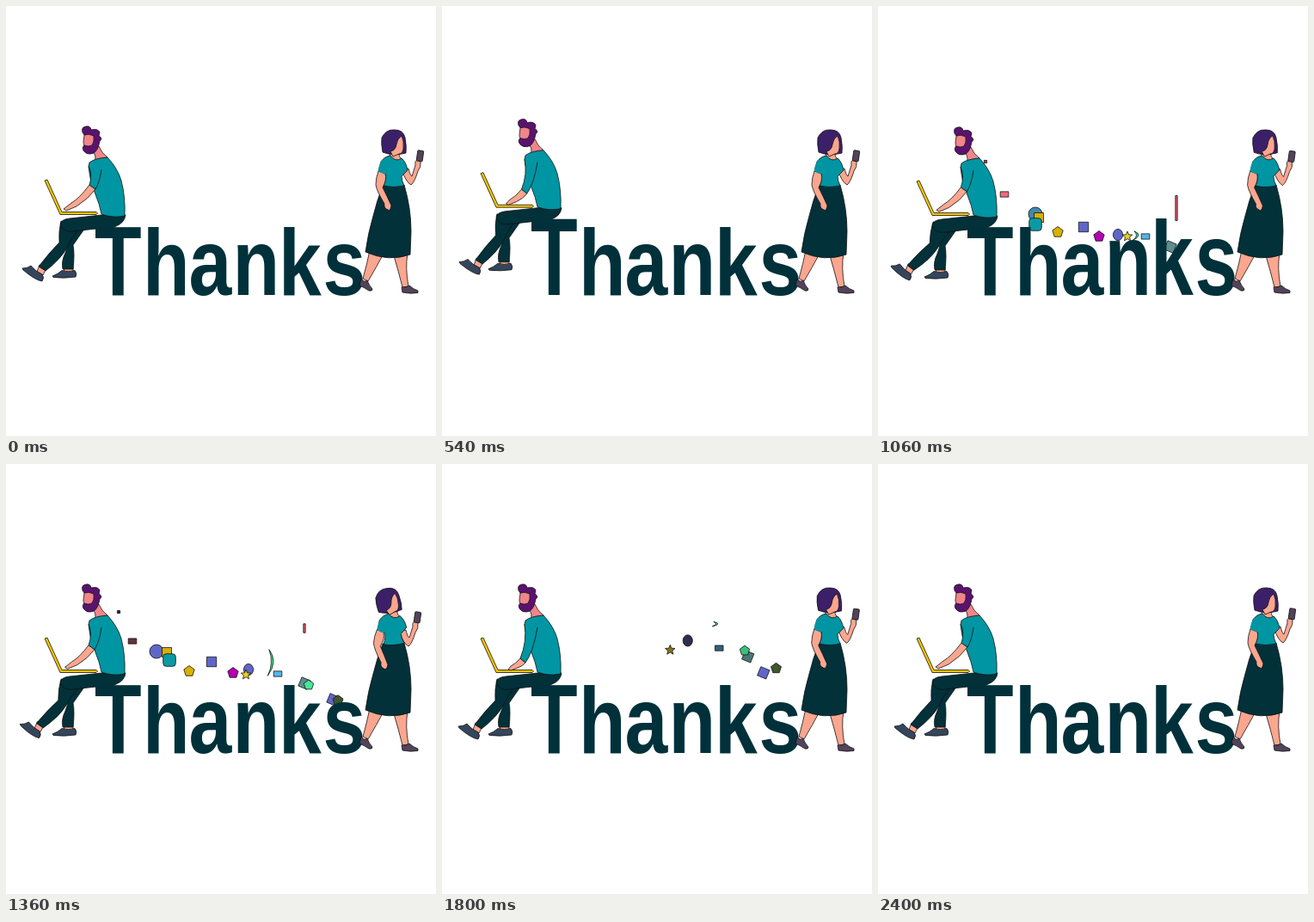
Animation, 500 px wide and 500 px high, one loop 2460 ms. Source, as an HTML page:

```html
<!DOCTYPE html>
<html lang="en">
<head>
<meta charset="utf-8">
<title>Thanks</title>
<style>
  html, body { margin: 0; width: 100%; height: 100%; overflow: hidden; background: #fff; }
  svg { display: block; width: 100vw; height: 100vh; }
  text { font: bold 110px "Liberation Sans", Arial, sans-serif; fill: #00313a; }
  .ink { stroke: #121212; stroke-width: .8; stroke-linejoin: round; }
  .dark { fill: #02313a; }
  .teal { fill: #0095a2; }
  .skin { fill: #fba68f; }
  .rosy { fill: #f0858a; }
  .plum { fill: #5a126e; }
  .violet { fill: #3b2069; }
  .gold { fill: #f7c600; }
  .slate { fill: #34465c; }
  .mauve { fill: #52435a; }
</style>
</head>
<body>
<svg viewBox="0 0 500 500">
  <g id="confetti" class="ink"></g>

  <g id="man" class="ink">
    <g>
      <path class="skin" d="M68 303 L67 310 L78 310 L78 303Z"/>
      <path class="slate" d="M54 314 Q60 312 65 307.500 Q72 310 80 307.500 Q83 311 81 315 Q68 317 55 315.500Z"/>
      <path class="dark" d="M72 258 Q74 275 69 287 Q64 297 66 306 L78 306 Q80 288 78 278 L92 258Z"/>
    </g>
    <g id="shin">
      <path class="skin" d="M39 301 L36 309 L43 313 L47 305Z"/>
      <path class="slate" d="M19 305 Q25 305 29 302 Q35 309 42 312 Q45 316 42 320 Q34 319 20 307Z"/>
      <path class="dark" d="M64 250 Q61 262 62 275 Q50 287 38 303 L46 308 Q64 294 71 281 Q77 268 84 260Z"/>
    </g>
    <path class="dark" d="M63 254 Q64 248 74 247 L111 243 L139 243 Q138 252 128 256 Q118 262 105 259 L78 262 Q67 264 63 254Z"/>
    <path class="gold" d="M45 203 L48 202 L65 239.500 L105 239.500 Q108 241 105 242.500 L63 242.500Z"/>
    <path class="rosy" d="M102 162 L108 163 Q111 171 118 176 L104 180 Q105 174 101 168Z"/>
    <path class="teal" d="M97 182 Q103 177 118 176 Q130 189 134 203 Q139 222 138 244 Q124 247 111 242 Q109 231 104 219 Q97 202 96 187Z"/>
    <path id="hand" class="skin"/>
    <path id="sleeve" class="teal"/>
    <g id="head">
      <path class="rosy" d="M91 150 Q95 146 103 150 L105 160 L95 167 Q90 164 90 158Z"/>
      <path class="plum" d="M89 147 Q87 141 93 140 Q98 139 99 144 Q107 142 109 147 L108 151 Q113 154 109 157 Q107 168 102 171 Q94 174 90 168 Q88 164 91 162 Q96 164 100 162 Q103 158 102 151 Q96 148 91 150Z"/>
    </g>
  </g>

  <g id="letters"></g>

  <g id="woman" class="ink">
    <path class="skin" d="M423 284 Q420 299 415 317 L421 320 Q431 303 439 288Z"/>
    <path class="skin" d="M450 287 Q456 307 461 327 L468 326 Q464 305 467 287Z"/>
    <path class="mauve" d="M413 317 Q416 322 420 319 Q422 325 426 329 Q426 332 422 331 Q416 327 411 325Z"/>
    <path class="mauve" d="M460 327 Q465 328 469 325 Q473 329 479 331 L479 333.500 Q470 335 461 333Z"/>
    <g id="phoneArm">
      <path class="skin" d="M460 190 L468 189 Q470 197 472 198 L476 185 Q475 179 479 179 L482 181 Q483 187 479 192 Q475 205 471 208 Q465 205 460 190Z"/>
      <rect class="mauve" x="478" y="168" width="7" height="12.500" rx="1" transform="rotate(8 481 174)"/>
    </g>
    <path class="dark" d="M438 209 L463 208 Q471 235 471 262 L470 289 Q445 298 418 286 Q421 264 427 244 Q431 227 438 209Z"/>
    <g id="torso">
      <path class="skin" d="M447 165 L459 168 Q455 174 460 178 Q454 184 446 177Z"/>
      <path class="teal" d="M436 181 Q440 175 447 174 Q453 182 460 177 Q465 181 467 191 L460 198 Q460 203 463 209 Q450 212 439 209 Q443 200 441 194 L433 192Z"/>
      <g id="looseArm">
        <path class="skin" d="M433 192 L441 195 Q443 202 438 211 Q443 221 448 232 Q447 239 444 237 Q439 235 440 230 Q431 215 430 208 Q430 200 433 192Z"/>
        <path class="teal" d="M437 179 Q433 186 433 192 Q438 196 443 195 L445 181Z" stroke="none"/>
      </g>
      <g id="bob">
        <path class="violet" d="M438 170 Q436 160 437 153 Q442 143 452 144 Q462 144 464 153 Q466 163 465 171 Q450 175 438 170Z"/>
        <path class="skin" d="M460 151 Q463 157 462 166 Q461 172 457 172 L450 175 L447 169 Q453 168 454 161 Q455 154 460 151Z"/>
      </g>
    </g>
  </g>
</svg>
<script>
const LOOP = 2460, STEP = 20, LAST = 2400;
const NS = 'http://www.w3.org/2000/svg';
const $ = id => document.getElementById(id);
const lerp = (a, b, k) => a + (b - a) * k;
const clamp = v => Math.max(0, Math.min(1, v));
const add = (parent, tag, attrs) => {
  const el = parent.appendChild(document.createElementNS(NS, tag));
  for (const k in attrs) el.setAttribute(k, attrs[k]);
  return el;
};

// Eased value from [time, value] pairs
const track = (...keys) => t => {
  let i = 1;
  while (i < keys.length - 1 && t > keys[i][0]) i++;
  const [t0, a] = keys[i - 1], [t1, b] = keys[i];
  const k = clamp((t - t0) / (t1 - t0));
  return lerp(a, b, (1 - Math.cos(Math.PI * k)) / 2);
};
const bump = (t, mid, half) =>
  Math.abs(t - mid) < half ? Math.cos((t - mid) / half * Math.PI / 2) ** 2 : 0;

// Letter, x, time of its hop, width and height factors
const letters = [
  ['T', 103.1, 550, .813, 1.043], ['h', 159, 710, .813, .99],
  ['a', 212.5, 800, .813, 1], ['n', 263.5, 970, .813, 1],
  ['k', 317, 1050, .813, .99], ['s', 368.5, 1120, .813, 1]
].map(([ch, x, mid, sx, sy]) => {
  const el = add($('letters'), 'text', {});
  el.textContent = ch;
  return { el, x, mid, sx, sy };
});

const poly = (n, inner) => {
  const count = inner ? n * 2 : n;
  return 'M' + Array.from({ length: count }, (_, i) => {
    const a = i / count * 2 * Math.PI - Math.PI / 2;
    const r = inner && i % 2 ? inner : 1;
    return `${(r * Math.cos(a)).toFixed(3)} ${(r * Math.sin(a)).toFixed(3)}`;
  }).join('L') + 'Z';
};
const shapes = {
  disc: 'M-1 0A1 1 0 1 1 1 0A1 1 0 1 1 -1 0Z',
  oval: 'M-.85 0A.85 1 0 1 1 .85 0A.85 1 0 1 1 -.85 0Z',
  box: 'M-1 -1H1V1H-1Z',
  soft: 'M-.5 -1H.5Q1 -1 1 -.5V.5Q1 1 .5 1H-.5Q-1 1 -1 .5V-.5Q-1 -1 -.5 -1Z',
  tilt: 'M-.5 -1.2L1.2 -.5L.5 1.2L-1.2 .5Z',
  slab: 'M-1 -.65H1V.65H-1Z',
  bar: 'M-.08 -1H.08V1H-.08Z',
  arc: 'M-.2 -1Q.5 -.1 -.3 1Q.18 0 -.2 -1Z',
  pent: poly(5),
  star: poly(5, .45)
};

const indigo = '#6066c8', amber = '#d9b000', sky = '#55b5ea', mint = '#45e896';
// Shape, colour, size, x and y at 1060 ms, x and y at 1360 ms, birth, death
const bits = [
  ['slab', '#f2697c', 4.8, 147, 219, 147, 206, 650, 1450],
  ['box', '#b03a55', 1.6, 125, 181, 131, 172, 900, 1430],
  ['disc', indigo, 8, 183, 242, 175, 218, 1160, 1700],
  ['disc', sky, 8, 183, 242, 175, 218, 640, 1240],
  ['box', amber, 5.5, 187, 246, 187, 219, 660, 1680],
  ['soft', '#0b9aa5', 7.3, 183, 254, 190, 228, 800, 1700],
  ['pent', amber, 6.5, 209, 263, 213, 241, 820, 1740],
  ['box', indigo, 5.7, 239, 257, 239, 230, 860, 1700],
  ['pent', '#b400b0', 6.5, 257, 268, 264, 243, 880, 1740],
  ['oval', indigo, 6.6, 279, 266, 282, 239, 920, 1880],
  ['star', '#e6cf22', 6, 290, 268, 279, 245, 940, 1930],
  ['arc', mint, 15.5, 301, 267, 309, 231, 960, 1850],
  ['slab', sky, 4.8, 311, 268, 316, 244, 950, 1920],
  ['bar', '#f0566b', 14.5, 347, 235, 347, 191, 680, 1450],
  ['tilt', '#5d8f90', 6, 340, 280, 347, 255, 960, 2000],
  ['pent', mint, 6, 352, 289, 352, 257, 1060, 2000],
  ['tilt', indigo, 6, 385, 299, 380, 274, 1080, 2120],
  ['pent', '#3f562f', 6.3, 384, 305, 386, 275, 1020, 2120]
].map(([shape, color, size, x0, y0, x1, y1, birth, death]) => ({
  el: add($('confetti'), 'path', { d: shapes[shape], 'vector-effect': 'non-scaling-stroke' }),
  swells: shape === 'bar' || shape === 'arc',
  color, size, x0, y0, x1, y1, birth, death
}));

const sag = track([0, 0], [300, 0], [740, 2], [1060, 1], [1360, 0], [LAST, 0]);
const kick = track([0, 0], [300, 0], [740, -2], [1060, 4.5], [1180, 7], [1360, 3], [1800, 0], [LAST, 0]);
const reach = track([0, 0], [300, .4], [740, 1], [1060, .1], [1360, .15], [1800, 1], [LAST, 0]);
const lean = track([0, 0], [740, 0], [1060, .15], [1360, 1], [1800, .1], [LAST, 0]);

const place = (id, value) => $(id).setAttribute('transform', value);

function drawMan(t) {
  place('man', `translate(0 ${sag(t) - 9.5 * bump(t, 550, 210)})`);
  place('shin', `rotate(${kick(t)} 66 253)`);
  const k = reach(t);
  const at = (x0, y0, x1, y1) => `${lerp(x0, x1, k)} ${lerp(y0, y1, k)} `;
  const cuffA = at(97, 208, 91, 226), cuffB = at(104, 213, 97, 231);
  $('hand').setAttribute('d', 'M' + cuffA + 'Q' + at(85, 224, 86, 232) + at(76, 229, 80, 235)
    + 'L' + at(67, 236, 77, 239) + 'L' + at(70, 238, 80, 240) + 'L' + at(82, 233, 88, 237)
    + 'Q' + at(96, 224, 94, 235) + cuffB + 'Z');
  $('sleeve').setAttribute('d', 'M96 186Q' + at(101, 196, 99, 207) + cuffA + 'L' + cuffB
    + 'Q' + at(109, 205, 106, 219) + '111 190');
}

function drawWoman(t) {
  const k = lean(t);
  place('torso', `rotate(${-3.5 * k} 451 210)`);
  place('bob', `translate(${-2 * k} 0) rotate(${-5 * k} 453 174)`);
  place('looseArm', `rotate(${7 * k} 438 188)`);
  place('phoneArm', `translate(${-3 * k} ${4 * k})`);
}

function drawLetters(t) {
  for (const { el, x, mid, sx, sy } of letters) {
    const hop = 1 + .12 * bump(t, mid, 210);
    el.setAttribute('transform', `translate(${x} 336) scale(${sx} ${sy * hop})`);
  }
}

function drawConfetti(t) {
  for (const b of bits) {
    const alive = t > b.birth && t < b.death;
    b.el.style.display = alive ? '' : 'none';
    if (!alive) continue;
    let s = (t - 1060) / 300;
    if (s > 1) s = 1 + (s - 1) * .85;
    const life = (t - b.birth) / (b.death - b.birth);
    const grow = b.swells ? Math.sin(Math.PI * life)
      : clamp((t - b.birth) / 100) * clamp((b.death - t) / 70);
    const r = b.size * grow;
    b.el.setAttribute('transform',
      `translate(${lerp(b.x0, b.x1, s)} ${lerp(b.y0, b.y1, s)}) scale(${b.swells ? b.size : r} ${r})`);
    const tint = b.swells ? 100 : 100 * clamp((b.death - t) / 250);
    b.el.style.fill = `color-mix(in srgb, ${b.color} ${tint}%, #141414)`;
  }
}

function draw(now) {
  const t = Math.min(LAST, Math.floor(now % LOOP / STEP) * STEP);
  drawMan(t);
  drawWoman(t);
  drawLetters(t);
  drawConfetti(t);
}

let start;
function tick(now) {
  start ??= now;
  draw(now - start);
  requestAnimationFrame(tick);
}
draw(0);
requestAnimationFrame(tick);
</script>
</body>
</html>
```
